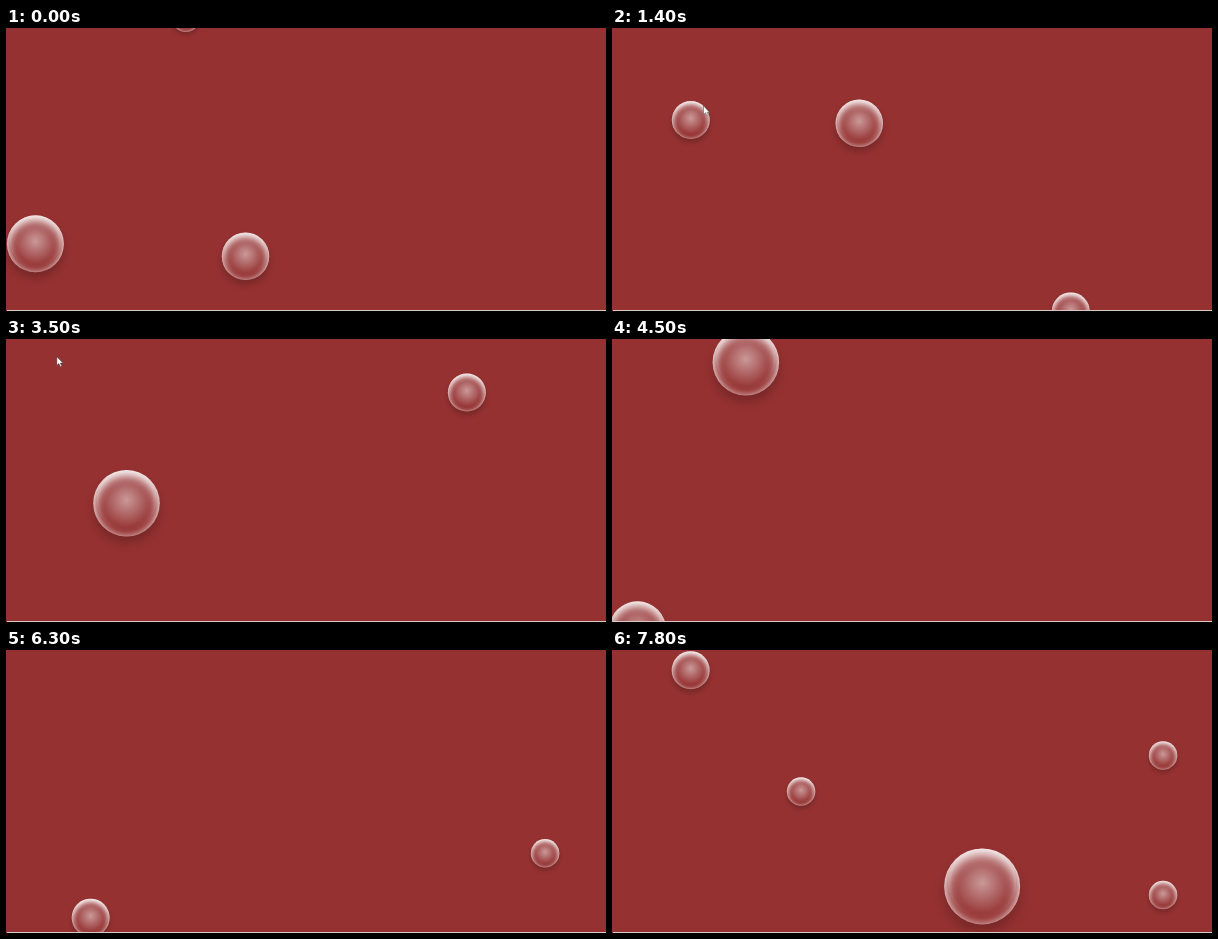
An HTML page for the animation above (7900 ms loop, 600 px wide and 283 px high).

```html
<!DOCTYPE html>
<html lang="en">
<head>
<meta charset="utf-8">
<title>Bubbles</title>
<style>
html, body { margin: 0; width: 100%; height: 100%; overflow: hidden; background: #953131; }
body { position: relative; }
body::after { content: ""; position: absolute; left: 1px; right: 0; top: 282px; height: 1px; background: #d9c8c8; }
.bubble {
  position: absolute; left: -47.5px; top: -47.5px; width: 95px; height: 95px; border-radius: 50%;
  box-shadow: 0 9.5px 14px rgba(0,0,0,.2), inset 0 4.75px 14px 2.4px #fff;
}
.bubble::after {
  content: ""; position: absolute; left: 4.75px; top: 0; width: 85.5px; height: 85.5px; border-radius: 50%;
  background: radial-gradient(circle, rgba(255,255,255,.5), rgba(255,255,255,0) 70%);
  box-shadow: inset 0 9.5px 14px rgba(255,255,255,.3);
}
svg { position: absolute; left: 0; top: 0; }
</style>
</head>
<body>
<svg id="cursor" width="8" height="12"><path d="M.5 .5V9L2.5 7.2 4 10.4 5.3 9.8 3.9 6.8H6.5Z" fill="#fff" stroke="#444" stroke-width=".5"/></svg>
<script>
const LOOP = 7.9, FLOOR = 283, SWAY = 15.5, PERIOD = 2.03, PEAK = 1.58;

// Each lane sends up equal bubbles; "entries" are the times their centres cross the floor.
const lanes = [
  { x: 40.4, scale: .6, speed: 185, entries: [-.365, 4.54] },
  { x: 250.5, scale: .5, speed: 95, entries: [-.58] },
  { x: 190.8, scale: .3, speed: 110, entries: [-2.67, 6.51] },
  { x: 93.5, scale: .4, speed: 165, entries: [.24, 6.205], opposite: true },
  { x: 462, scale: .4, speed: 109.5, entries: [1.4] },
  { x: 135.4, scale: .7, speed: 141, entries: [2.655], opposite: true },
  { x: 552.8, scale: .3, speed: 65.2, entries: [5.07, 7.21] },
  { x: 371.9, scale: .8, speed: 82.5, entries: [7.23] }
];

// CSS "ease": cubic-bezier(.25, .1, .25, 1)
function ease(x) {
  let lo = 0, hi = 1, u;
  for (let i = 0; i < 20; i++) {
    u = (lo + hi) / 2;
    if (.75 * u * (1 - u) + u ** 3 < x) lo = u; else hi = u;
  }
  return .3 * u * (1 - u) ** 2 + 3 * u * u * (1 - u) + u ** 3;
}

// Leftward ease, then the same path reversed
function sway(t) {
  const p = ((t - PEAK) / PERIOD + 9) % 1 * 2;
  return SWAY * ease(p < 1 ? p : 2 - p);
}

function place(node, x, y, scale = 1) {
  node.style.transform = `translate(${x}px, ${y}px) scale(${scale})`;
}

const bubbles = lanes.flatMap(lane => lane.entries.map(entry => {
  const node = document.createElement("div");
  node.className = "bubble";
  document.body.insertBefore(node, cursor);
  return { ...lane, entry, node };
}));

function draw(t) {
  for (const { node, x, scale, speed, entry, opposite } of bubbles) {
    const shift = opposite ? PERIOD / 2 : 0;
    place(node, x - sway(t + shift), FLOOR - speed * (t - entry), scale);
  }
  // The pointer glides in, rests, and leaves the way it came.
  const away = Math.max(0, 1.3 - t, t - 3.2);
  place(cursor, 91 - 135 * away, 77.5 - 200 * away);
}

const start = performance.now();
function tick() {
  draw((performance.now() - start) / 1000 % LOOP);
  requestAnimationFrame(tick);
}
tick();
</script>
</body>
</html>
```
